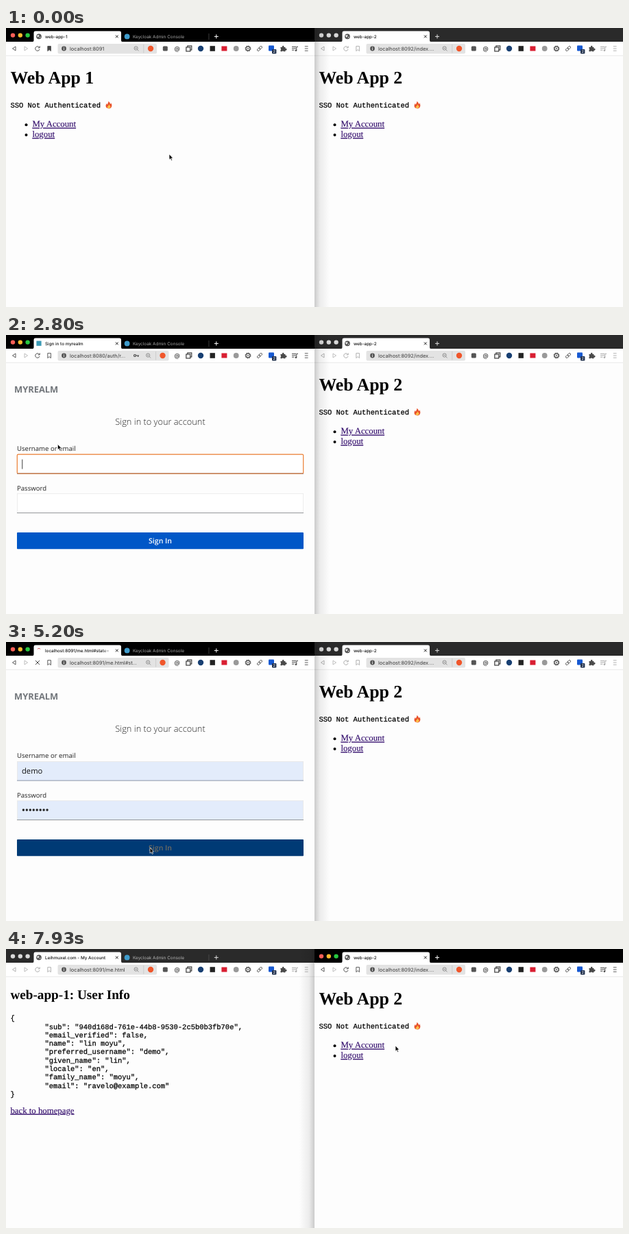
An HTML page for the animation above (8 s loop, 900x407 px).

```html
<!DOCTYPE html>
<html lang="en">
<head>
<meta charset="utf-8">
<title>Single sign-on demo</title>
<style>
html, body { margin: 0; width: 100%; height: 100%; overflow: hidden; background: #fdfdfd; }
svg { display: block; width: 900px; height: 407px; }
text { white-space: pre; text-rendering: geometricPrecision; }
.ui { font-family: Inter, sans-serif; }
.serif { font-family: "Liberation Serif", serif; }
.mono { font-family: "Liberation Mono", monospace; font-size: 10.46px; stroke: #000; stroke-width: .25px; }
.link { stroke: #35106e; stroke-width: .15px; }
.form { font-family: "Open Sans", sans-serif; }
</style>
</head>
<body>
<svg viewBox="0 0 900 407">
  <defs>
    <linearGradient id="shade">
      <stop offset="0" stop-color="#000" stop-opacity=".2"/>
      <stop offset=".35" stop-color="#000" stop-opacity=".07"/>
      <stop offset="1" stop-color="#000" stop-opacity="0"/>
    </linearGradient>
    <linearGradient id="fade">
      <stop offset="0" stop-color="#fff" stop-opacity="0"/>
      <stop offset="1" stop-color="#fff"/>
    </linearGradient>
  </defs>
  <g id="scene"></g>
  <path id="spin" d="M-3 0A3 3 0 0 1 0-3" fill="none" stroke="#d0565a" stroke-width=".9"/>
  <g id="arrow"><path d="M0 0V8.2L1.9 6.5L3.2 9.4L4.5 8.8L3.2 6H5.6Z" fill="#000" stroke="#fff" stroke-width=".7"/></g>
  <g id="hand"><path d="M-.8 0.6Q0-.5.8.6V3.4L3.9 4.1Q4.8 4.5 4.6 6L3.9 9.6H-.8L-3 6.2Q-3.2 5.2-2.2 5.4L-.8 6.4Z" fill="#fff" stroke="#111" stroke-width=".75"/></g>
</svg>
<script>
const LOOP = 8000, LINK = '#35106e';
const T = { load: 1790, login: 2520, focus: 3080, type1: 3270, type2: 3430, fill: 4020,
            hover: 4760, submit: 4960, info: 5500, swap: 7260 };
// time, x, y of the pointer tip
const PATH = [[0, 238, 184], [300, 238, 184], [1250, 72, 142], [2650, 72, 142], [3080, 84, 203],
  [3600, 84, 203], [3950, 62, 217], [4150, 62, 217], [4580, 202, 286], [4850, 210, 300],
  [6180, 210, 300], [6850, 535, 184], [7280, 535, 184], [7680, 568, 141], [LOOP, 568, 141]];

const $ = id => document.getElementById(id);
const rect = (x, y, w, h, fill, extra = '') => `<rect x="${x}" y="${y}" width="${w}" height="${h}" fill="${fill}" ${extra}/>`;
const circle = (x, y, r, fill, extra = '') => `<circle cx="${x}" cy="${y}" r="${r}" fill="${fill}" ${extra}/>`;
const line = (d, color, w = .9) => `<path d="${d}" fill="none" stroke="${color}" stroke-width="${w}"/>`;
const text = (cls, x, y, size, s, fill = '#000', extra = '') =>
  `<text class="${cls}" x="${x}" y="${y}" font-size="${size}" fill="${fill}" ${extra}>${s}</text>`;
const mono = (x, y, s) => `<text class="mono" x="${x}" y="${y}">${s}</text>`;
const link = (x, y, s) => text('serif link', x, y, 12.8, s, LINK, 'text-decoration="underline"');
const cross = (x, y, r, c, w) => line(`M${x - r} ${y - r}L${x + r} ${y + r}M${x + r} ${y - r}L${x - r} ${y + r}`, c, w);

function globe(x, y, r = 3.8) {
  return circle(x, y, r, '#555') +
    `<path d="M${x - r * .8} ${y - r * .4}l${r * .8}-.6l.4 1.6l-1.6 1.2l.6 1.6zM${x + r * .2} ${y + r * .7}l.4-2l1.8-.4z" fill="#fff"/>`;
}

function flame(x, y) {
  return `<g transform="translate(${x} ${y})"><path d="M-1-5.4C2-3.6 1.6-1.8 2.4-1.2Q3.2-1.8 3-3C5-.8 5.4 5 0 5.2C-5.6 5-5-.4-3-2.2Q-3-.8-2-.4C-2-2.4.2-3.2-1-5.4Z" fill="#e8502a"/>` +
    `<path d="M.2-1.2C.6 1 2.8 1 2.4 3.2Q1.8 5 0 5Q-2.6 4.8-2.4 2.6Q-2 2.8-1.6 2.4Q-.2 1.2.2-1.2Z" fill="#fbc04a"/></g>`;
}

function tools(w) {
  const c = w.active ? '#4a4a4a' : '#aaa', wide = w.wide ? 17.5 : 0, end = 220 + wide;
  let s = line('M14 27L9.5 30L14 33Z', c) + line('M27 27L31.5 30L27 33Z', '#b5b5b5');
  s += w.loading ? cross(46, 30, 3, '#444', 1)
    : line('M48.6 28.3A3.2 3.2 0 1 0 49 31M49.2 26.4V28.9H46.7', c, 1);
  s += `<path d="M60.8 26.6H65.4V33.6L63.1 31.6L60.8 33.6Z" fill="${w.marked ? '#444' : 'none'}" stroke="${c}" stroke-width=".9"/>`;
  s += rect(75.5, 23, end - 75.5, 14.5, '#e3e3e3', 'rx="2"');
  s += circle(84.5, 30, 3.4, '#555') + rect(84.1, 29.5, .9, 2.4, '#fff') + rect(84.1, 27.8, .9, .9, '#fff');
  s += text('ui', 93, 32.6, 7.35, w.url, '#3c3c3c');
  if (w.key) s += circle(188, 30, 1.5, 'none', 'stroke="#444" stroke-width="1.2"') + line('M189.6 30H194M192.6 30V32', '#444', 1.2);
  s += circle(189.6 + wide, 29.5, 2.6, 'none', 'stroke="#777" stroke-width=".8"') +
    line(`M${191.5 + wide} 31.4l2 2M${188.4 + wide} 29.5h2.4`, '#777', .8);
  s += rect(200.5 + wide, 24, .7, 12.5, '#c4c4c4') + circle(211 + wide, 30, 4.2, '#f0562b');
  if (!w.wide) s += rect(228.8, 26.6, 7, 6.8, '#555', 'rx="1.5"');
  s += text('ui', 249.5, 32.8, 8.4, '@', '#333', 'text-anchor="middle" font-weight="500"');
  s += rect(264.8, 26, 6, 6, 'none', 'stroke="#333" stroke-width="1.1"') + rect(262.8, 28, 6, 6, '#eee', 'stroke="#333" stroke-width="1.1"');
  s += circle(284, 30, 4.2, '#183f72') + rect(297.5, 26.2, 7.4, 7.6, '#222');
  s += rect(314.4, 26.5, 8, 7, '#d91f32') + circle(335.7, 30, 3.9, '#999');
  s += circle(353, 30, 3, 'none', 'stroke="#555" stroke-width="1.4"') +
    circle(353, 30, 4, 'none', 'stroke="#555" stroke-width="1" stroke-dasharray="1.6 1.54"') + circle(353, 30, 1, '#555');
  s += `<g transform="rotate(-45 370 30)">${rect(365.7, 28.4, 5, 3.2, 'none', 'rx="1.6" stroke="#555" stroke-width=".9"')}${rect(369.3, 28.4, 5, 3.2, 'none', 'rx="1.6" stroke="#555" stroke-width=".9"')}</g>`;
  s += rect(383, 25.5, 8, 8, '#1759d1', 'rx="1"') + rect(388, 31, 6.4, 6.4, '#20304c', 'rx="1"') +
    text('ui', 391.2, 36.3, 5.6, '2', '#fff', 'text-anchor="middle"');
  s += `<path d="M400.5 28H403A1.4 1.4 0 1 1 405.4 28H407.5V30A1.4 1.4 0 1 1 407.5 32.4V34.2H405A1.3 1.3 0 0 0 402.6 34.2H400.5V32A1.3 1.3 0 0 0 400.5 29.8Z" fill="#4a4a4a"/>`;
  s += line('M417 27.4H423M417 29.8H423M417 32.2H420.4M423.8 33V27.4H426', c, 1) + circle(422.9, 32.8, 1.3, c);
  return s + line('M435.8 26.8H440.6M435.8 30H440.6M435.8 33.2H440.6', c, .9);
}

function chrome(w) {
  const bar = w.active ? '#000' : '#2a2a2a';
  let s = rect(0, 0, 450, 20, bar);
  ['#fb5f57', '#fdbc2e', '#28c840'].forEach((c, i) => s += circle(10 + i * 10.8, 10.6, 3.2, w.active ? c : '#d9d9d9'));
  s += `<path d="M39 20Q40.5 20 40.5 18V7Q40.5 4.6 43 4.6H165.5Q168 4.6 168 7V18Q168 20 169.5 20Z" fill="#fff"/>`;
  s += rect(0, 20, 450, 20, '#fff') + rect(0, 39.8, 450, .8, '#e4e4e4');
  if (w.icon === 'globe') s += globe(48, 12.4);
  if (w.icon === 'realm') s += rect(44.4, 8.6, 7.2, 7.2, '#3c9bb5');
  s += text('ui', 57, 14.7, 6.3, w.title, '#111', 'font-weight="500"');
  if (w.loading) s += rect(140, 6, 14, 13, 'url(#fade)') + rect(154, 6, 12, 13, '#fff');
  s += cross(161.8, 12.4, 1.9, '#222', 1);
  if (w.second) {
    const c = w.active ? '#a6a6a6' : '#b4b4b4';
    s += circle(176.6, 12.4, 3.9, '#3f9ccc') + text('ui', 185, 14.7, 6.4, 'Keycloak Admin Console', c) + rect(295.6, 8, .7, 9, '#555');
  }
  const px = w.second ? 306.8 : 179;
  s += line(`M${px - 3} 12.4h6M${px} 9.4v6`, w.active ? '#fff' : '#ddd', 1);
  return s + tools(w);
}

function home(n) {
  return text('serif', 6.4, 80.6, 25.8, 'Web App ' + n, '#000', 'font-weight="bold"') +
    mono(6.4, 115.6, 'SSO Not Authenticated') + flame(150, 112.2) +
    circle(29.5, 141.2, 2, '#000') + link(38.4, 144.4, 'My Account') +
    circle(29.5, 156, 2, '#000') + link(38.4, 159.2, 'logout');
}

function dots(x, y, r, step) {
  return Array.from({ length: 8 }, (_, i) => circle(x + i * step, y, r, '#222')).join('');
}

function login(t) {
  const filled = t >= T.fill, sent = t >= T.submit, bg = filled ? '#e3ecfb' : '#fff';
  const typed = filled ? 'demo' : t >= T.type2 ? 'de' : t >= T.type1 ? 'd' : '';
  let s = text('form', 12, 84.4, 12.9, 'MYREALM', '#72767b', 'font-weight="bold"');
  s += text('form', 225, 131, 12.8, 'Sign in to your account', '#222', 'font-weight="300" text-anchor="middle"');
  s += text('form', 16, 169.3, 9.6, 'Username or email', '#222') + text('form', 16, 226.6, 9.6, 'Password', '#222');
  s += rect(16.4, 174.4, 417.2, 27.8, bg, 'stroke="#e6e6e6" stroke-width=".8"') + rect(16, 201.6, 418, 1, sent ? '#8f9bb0' : '#2a62a8');
  if (!sent) s += rect(16.3, 174.2, 417.4, 28, 'none', 'rx="1.5" stroke="#ee8034" stroke-width="1.2"');
  s += text('form', 23, 192.2, 11.2, typed, '#111');
  if (!filled) s += rect(23.4 + typed.length * 5.9 + (typed ? .9 : 0), 181.5, .8, 14, '#111');
  s += rect(16.4, 231.4, 417.2, 28, bg, 'stroke="#e9e9e9" stroke-width=".8"') + rect(16, 259, 418, .9, '#8a8d90');
  if (filled) s += dots(25.4, 245, 1.7, 4.95);
  s += rect(16, 288, 418, 24.2, t >= T.hover ? '#003a75' : '#0057c7', 'rx="1"');
  s += text('form', 225, 303.8, 10.5, 'Sign In', sent ? '#6f6c62' : '#fff', 'font-weight="600" text-anchor="middle"');
  if (t >= T.focus && !filled) {
    s += rect(15.4, 204.6, 104.4, 60.6, '#000', 'opacity=".12" rx="2"') + rect(16, 204, 103, 60, '#fff', 'rx="1.5" stroke="#d4d4d4" stroke-width=".6"');
    s += globe(25.8, 223, 3.6) + text('ui', 35.4, 219.6, 6.9, 'demo', '#222') + dots(36.8, 229.6, 1.1, 3.25);
    s += rect(16, 242.4, 103, .8, '#ddd') + text('ui', 21.4, 256.2, 6.7, 'Passwörter verwalten...', '#222');
  }
  return s;
}

function info() {
  const rows = ['"sub": "940d168d-761e-44b8-9530-2c5b0b3fb70e",', '"email_verified": false,', '"name": "lin moyu",',
    '"preferred_username": "demo",', '"given_name": "lin",', '"locale": "en",', '"family_name": "moyu",', '"email": "ravelo@example.com"'];
  let s = text('serif', 6.4, 73.4, 19.2, 'web-app-1: User Info', '#000', 'font-weight="bold"') + mono(6.4, 104.2, '{');
  rows.forEach((r, i) => s += mono(56.4, 116.5 + i * 12.3, r));
  return s + mono(6.4, 215, '}') + link(6.4, 239.6, 'back to homepage');
}

function leftState(t) {
  const w = { active: t < T.swap, second: true, icon: 'globe' };
  if (t < T.load) return { ...w, title: 'web-app-1', url: 'localhost:8091', marked: true };
  if (t < T.login) return { ...w, icon: '', loading: true, title: 'localhost:8080/auth/realms/my', url: 'localhost:8080/auth/r...' };
  if (t < T.submit) return { ...w, icon: 'realm', wide: true, key: true, title: 'Sign in to myrealm', url: 'localhost:8080/auth/r...' };
  if (t < T.info) return { ...w, icon: '', loading: true, wide: true, title: 'localhost:8091/me.html#state=', url: 'localhost:8091/me.html#st...' };
  return { ...w, title: 'Leihmuxel.com - My Account', url: 'localhost:8091/me.html' };
}

function scene(t) {
  const right = { active: t >= T.swap, icon: 'globe', title: 'web-app-2', url: 'localhost:8092/index....' };
  const page = t < T.login ? home(1) : t < T.info ? login(t) : info();
  const side = right.active ? 'matrix(-1 0 0 1 450 0)' : 'translate(450 0)';
  return rect(0, 0, 900, 407, '#fdfdfd') + page + chrome(leftState(t)) +
    `<g transform="translate(450 0)">${home(2)}${chrome(right)}</g>` +
    rect(0, 0, 22, 407, 'url(#shade)', `transform="${side}"`);
}

function pointer(t) {
  const i = PATH.findIndex(p => p[0] > t), [t0, x0, y0] = PATH[i - 1], [t1, x1, y1] = PATH[i];
  const u = (t - t0) / (t1 - t0), e = u * u * (3 - 2 * u);
  return [x0 + (x1 - x0) * e, y0 + (y1 - y0) * e];
}

const marks = Object.values(T);
let last = -1;
function draw(t) {
  const step = marks.filter(m => m <= t).length;
  if (step !== last) { $('scene').innerHTML = scene(t); last = step; }
  const [x, y] = pointer(t);
  const onLink = t < T.login && x > 38 && x < 103 && y < 160, onButton = t >= T.hover && t < T.submit;
  const hand = onLink || onButton;
  $('hand').style.display = hand ? '' : 'none';
  $('arrow').style.display = hand ? 'none' : '';
  $(hand ? 'hand' : 'arrow').setAttribute('transform', `translate(${x} ${y})`);
  const busy = (t >= T.load && t < T.login) || (t >= T.submit && t < T.info);
  $('spin').style.display = busy ? '' : 'none';
  $('spin').setAttribute('transform', `translate(48 12.4) rotate(${(t - 2200) * .36 + 45})`);
}

const start = performance.now();
function tick() {
  draw((performance.now() - start) % LOOP);
  requestAnimationFrame(tick);
}
tick();
</script>
</body>
</html>
```
